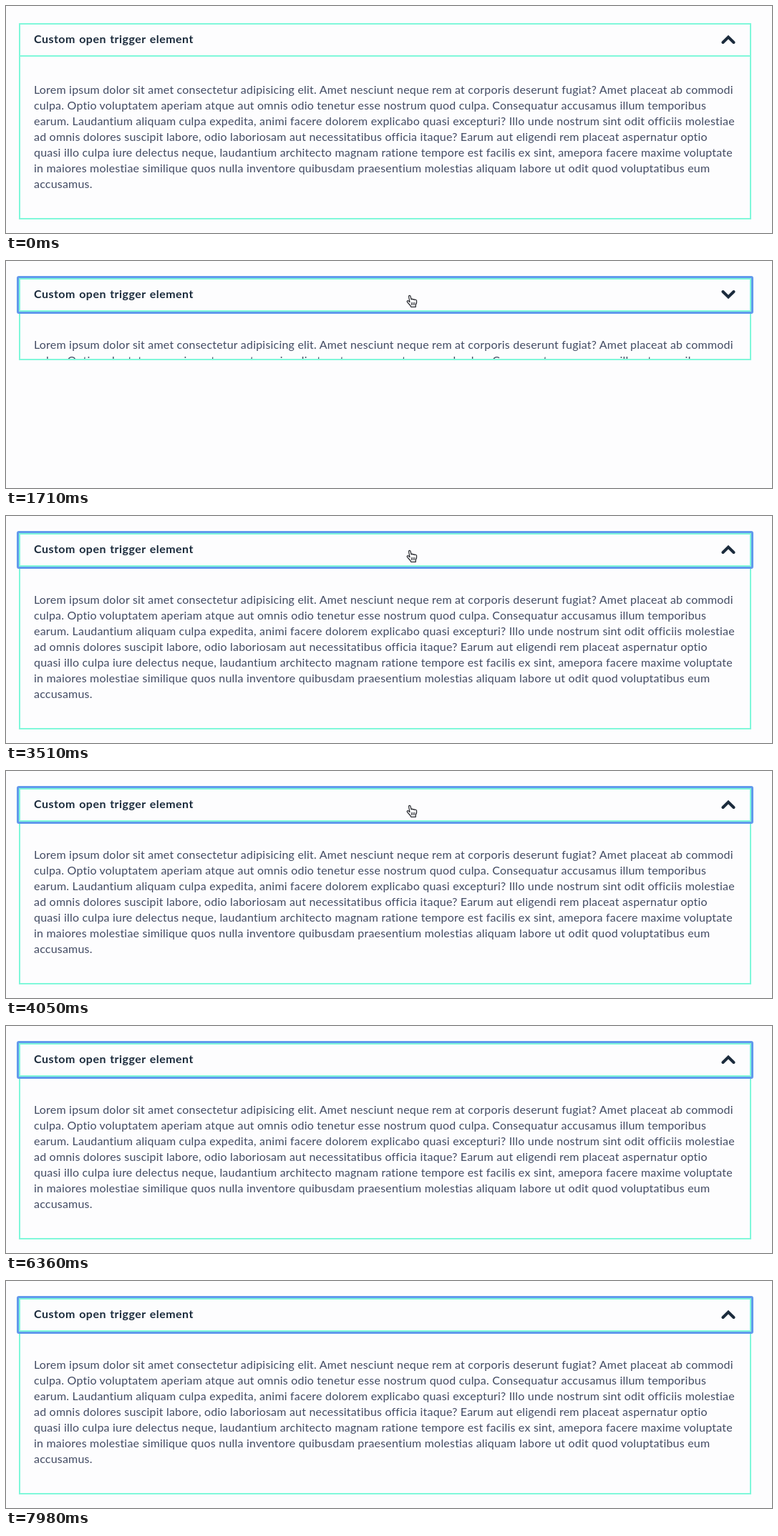
Recreate the animation shown at these times as an HTML page. Size 1070 px wide and 318 px high, loop 8000 ms.

```html
<!DOCTYPE html>
<html lang="en">
<head>
<meta charset="utf-8">
<title>Collapsible panel</title>
<style>
  :root {
    --ink: #1b2b3c;
    --line: #80f8da;
    --loop: 8s infinite;
  }
  html, body {
    margin: 0;
    width: 100%;
    height: 100%;
    overflow: hidden;
    background: #fdfdfe;
  }
  body {
    position: relative;
    font: 16px/22px Lato, "Open Sans", sans-serif;
    white-space: nowrap;
  }
  body * { box-sizing: border-box; }
  .panel, .head, .ring, .title, .text, svg { position: absolute; }

  .panel {
    left: 18px;
    top: 71px;
    width: 1023px;
    height: 228px;
    border: 2px solid var(--line);
    border-top: 0;
    overflow: hidden;
    animation: fold linear var(--loop);
  }
  .text {
    left: 19px;
    top: 35px;
    margin: 0;
    color: #424b63;
    letter-spacing: .2px;
  }
  .head {
    left: 18px;
    top: 24px;
    width: 1023px;
    height: 47px;
    border: 2px solid var(--line);
  }
  .ring {
    left: 15px;
    top: 21px;
    width: 1029px;
    height: 53px;
    border: 3px solid #6199ec;
    border-radius: 3px;
    animation: focus step-end var(--loop);
  }
  .title {
    left: 39px;
    top: 35px;
    font-weight: 700;
    letter-spacing: .48px;
    word-spacing: .9px;
    color: var(--ink);
  }
  .opened { animation: opened step-end var(--loop); }
  .closed { animation: closed step-end var(--loop); }
  .chevron {
    left: 999px;
    top: 37px;
    width: 20px;
    height: 20px;
    fill: none;
    stroke: var(--ink);
    stroke-width: 4;
    stroke-linecap: round;
    animation: flip step-end var(--loop);
  }
  .cursor {
    position: absolute;
    left: 0;
    top: 0;
    animation: move linear var(--loop);
  }
  .cursor svg {
    left: 0;
    top: 0;
    width: 17px;
    height: 19px;
    overflow: visible;
    fill: #fff;
    stroke: #26282e;
    stroke-width: 1.2;
    stroke-linejoin: round;
    stroke-linecap: round;
  }
  .hand { animation: hand step-end var(--loop); }
  .arrow { animation: arrow step-end var(--loop); }

  /* Toggles: close 1430, open 2850, close 4827, open 5930; each takes 400 ms */
  @keyframes fold {
    0%, 17.875% { height: 228px; }
    22.875%, 35.625% { height: 0; }
    40.625%, 60.34% { height: 228px; }
    65.34%, 74.125% { height: 0; }
    79.125%, 100% { height: 228px; }
  }
  @keyframes flip {
    0%, 35.625%, 74.125%, 100% { transform: none; }
    17.875%, 60.34% { transform: scaleY(-1); }
  }
  @keyframes opened {
    0%, 35.625%, 74.125%, 100% { visibility: visible; }
    22.875%, 65.34% { visibility: hidden; }
  }
  @keyframes closed {
    0%, 35.625%, 74.125%, 100% { visibility: hidden; }
    22.875%, 65.34% { visibility: visible; }
  }
  @keyframes focus {
    0% { visibility: hidden; }
    17.6%, 100% { visibility: visible; }
  }
  @keyframes move {
    0%, 8.5% { transform: translate(985px, 330px); animation-timing-function: ease-out; }
    13.4% { transform: translate(927px, 51px); }
    14.9% { transform: translate(927px, 51px); animation-timing-function: ease-in-out; }
    17.4% { transform: translate(559px, 47px); }
    74.8% { transform: translate(559px, 47px); animation-timing-function: ease-in; }
    77.9%, 100% { transform: translate(1080px, -25px); }
  }
  @keyframes hand {
    0%, 76.2%, 100% { visibility: hidden; }
    12.2% { visibility: visible; }
  }
  @keyframes arrow {
    0%, 76.2%, 100% { visibility: visible; }
    12.2% { visibility: hidden; }
  }
</style>
</head>
<body>
  <div class="panel">
    <p class="text">Lorem ipsum dolor sit amet consectetur adipisicing elit. Amet nesciunt neque rem at corporis deserunt fugiat? Amet placeat ab commodi<br>
      culpa. Optio voluptatem aperiam atque aut omnis odio tenetur esse nostrum quod culpa. Consequatur accusamus illum temporibus<br>
      earum. Laudantium aliquam culpa expedita, animi facere dolorem explicabo quasi excepturi? Illo unde nostrum sint odit officiis molestiae<br>
      ad omnis dolores suscipit labore, odio laboriosam aut necessitatibus officia itaque? Earum aut eligendi rem placeat aspernatur optio<br>
      quasi illo culpa iure delectus neque, laudantium architecto magnam ratione tempore est facilis ex sint, amepora facere maxime voluptate<br>
      in maiores molestiae similique quos nulla inventore quibusdam praesentium molestias aliquam labore ut odit quod voluptatibus eum<br>
      accusamus.</p>
  </div>
  <div class="head"></div>
  <div class="ring"></div>
  <div class="title opened">Custom open trigger element</div>
  <div class="title closed">Custom closed trigger element</div>
  <svg class="chevron" viewBox="0 0 20 20"><path d="M2.5 14 10 6.5 17.5 14"/></svg>
  <div class="cursor">
    <svg class="arrow" viewBox="0 0 17 19"><path d="M4 1V15L7.2 12 9.3 17 11.5 16 9.4 11.3H13.8Z"/></svg>
    <svg class="hand" viewBox="0 0 17 19">
      <path d="M5 10.5 3.6 3.2C3.2 1 5.6.6 6.1 2.6L7.2 7C7.6 5.6 9.4 5.8 9.6 7.2 10 6.2 11.6 6.4 11.9 7.6 12.5 6.8 14.4 7.2 14.6 8.6 15 11 14.4 12.6 13.4 14.2L13.2 17.4H6.8C6.2 15 3.4 13 1.6 10.6.4 9 2.4 8 3.6 9.2Z"/>
      <path d="M7.6 11.3V14.6M9.7 11.3V14.6M11.8 11.3V14.6" stroke-width="1"/>
    </svg>
  </div>
</body>
</html>
```
